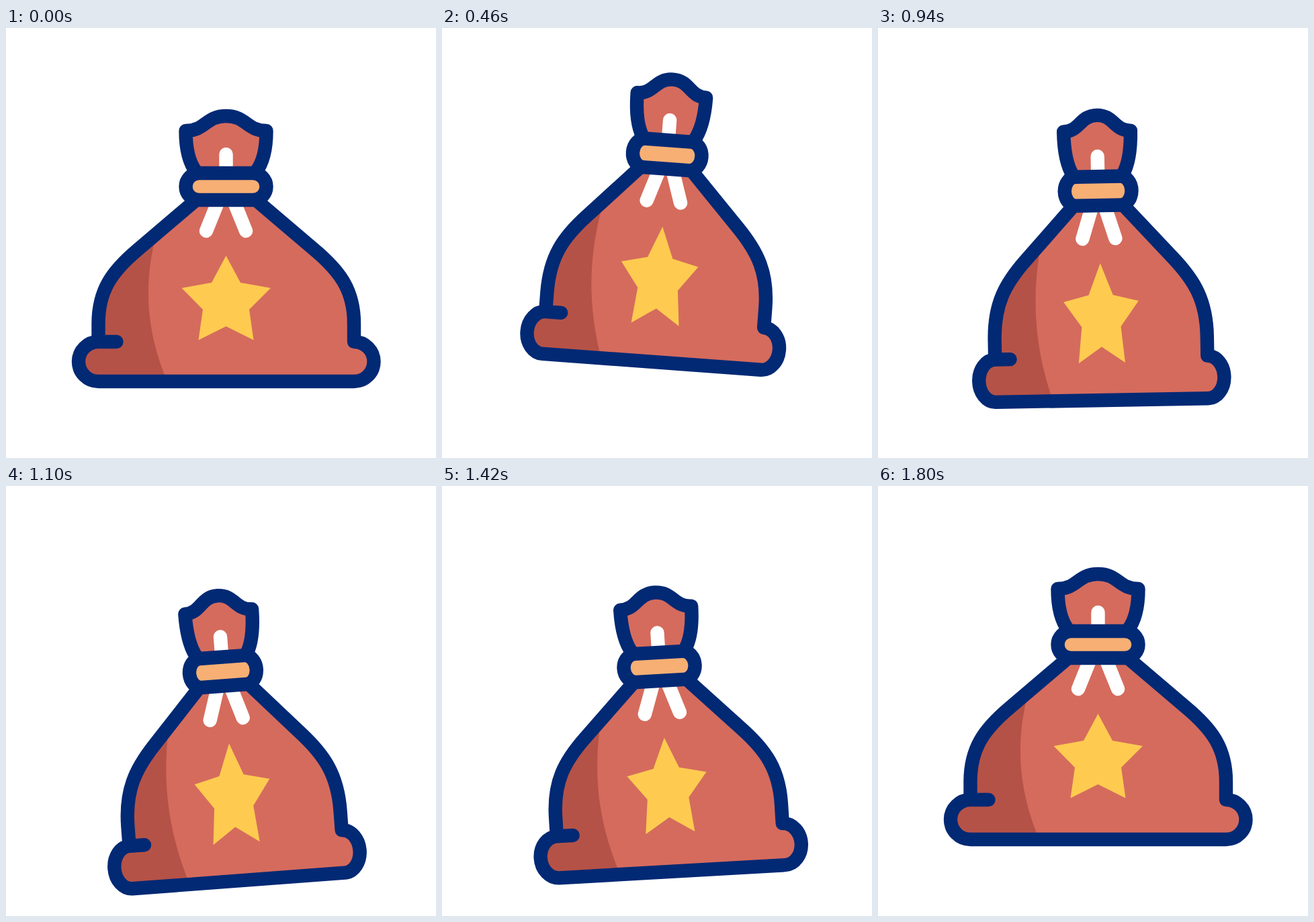
Animation, 640 px wide and 640 px high, one loop 1820 ms. Source, as an HTML page:

```html
<!DOCTYPE html>
<html lang="en">
<head>
<meta charset="utf-8">
<title>Bouncing bag</title>
<style>
  html, body { margin: 0; width: 100%; height: 100%; overflow: hidden; background: #fff; }
  svg { display: block; width: 640px; height: 640px; }
  path, rect { vector-effect: non-scaling-stroke; stroke-linecap: round; stroke-linejoin: round; }
  .line { stroke: #022974; stroke-width: 20.4px; }
  .red { fill: #d56b5d; }
  .shade { fill: #b55247; }
  .none { fill: none; }
  .string { fill: none; stroke: #fff; stroke-width: 20.4px; }
</style>
</head>
<body>
<svg viewBox="0 0 640 640">
  <g id="bag">
    <path class="red" d="M283 256L196 330C158 362 137.5 390 137.5 440V467A29.5 29.5 0 0 0 137.5 526H518A29.5 29.5 0 0 0 518 467V440C518 390 497 362 459 330L372 256Z"/>
    <path class="shade" d="M224 306L196 330C158 362 137.5 390 137.5 440V467A29.5 29.5 0 0 0 137.5 526H240C210 455 203 385 224 306Z"/>
    <path class="red line" d="M283 214C272 200 267.5 180 267.5 153C297 153 297 131 327.5 131C358 131 358 153 387.5 153C387.5 180 383 200 372 214"/>
    <path class="string" d="M327.5 188V229L298 302M327.5 229L357 302"/>
    <path class="none line" d="M283 256L196 330C158 362 137.5 390 137.5 440V467M164.5 467H137.5A29.5 29.5 0 0 0 137.5 526H518A29.5 29.5 0 0 0 518 467V440C518 390 497 362 459 330L372 256"/>
    <rect class="line" x="267.5" y="216" width="120" height="40" rx="20" fill="#f7af74"/>
  </g>
  <path id="star" fill="#fecb50" d="M327.5 339L349 379L394 387L362 419L368.5 464.5L327.5 444L286.5 464.5L293 419L261.5 387L306 379Z"/>
</svg>
<script>
const LOOP = 1820, STEP = 600;

// Matrix that scales and turns around an anchor, then puts the anchor at (x, y).
function pose([ax, ay], x, y, deg, sx, sy) {
  const r = deg * Math.PI / 180;
  const a = Math.cos(r) * sx, b = Math.sin(r) * sx;
  const c = -Math.sin(r) * sy, d = Math.cos(r) * sy;
  return [a, b, c, d, x - a * ax - c * ay, y - b * ax - d * ay];
}

// Rest, stretched up, stretched down, rest.
function poses(id, anchor, up, down, sx, sy) {
  const rest = [1, 0, 0, 1, 0, 0];
  return {
    node: document.getElementById(id),
    keys: [rest, pose(anchor, ...up, 5, sx, sy), pose(anchor, ...down, -5, sx, sy), rest]
  };
}

const parts = [
  poses("bag", [327.5, 236], [336.4, 180.8], [321.8, 283.5], 0.834, 1.078),
  poses("star", [327.5, 339], [328.4, 289], [332.3, 390.6], 0.846, 1.188)
];

function draw(now) {
  const p = Math.min(now % LOOP / STEP, 3);
  const i = Math.min(Math.floor(p), 2), u = p - i;
  const k = u * u * (3 - 2 * u);
  for (const { node, keys } of parts) {
    const m = keys[i].map((v, n) => v + (keys[i + 1][n] - v) * k);
    node.setAttribute("transform", `matrix(${m})`);
  }
  requestAnimationFrame(draw);
}
draw(0);
</script>
</body>
</html>
```
